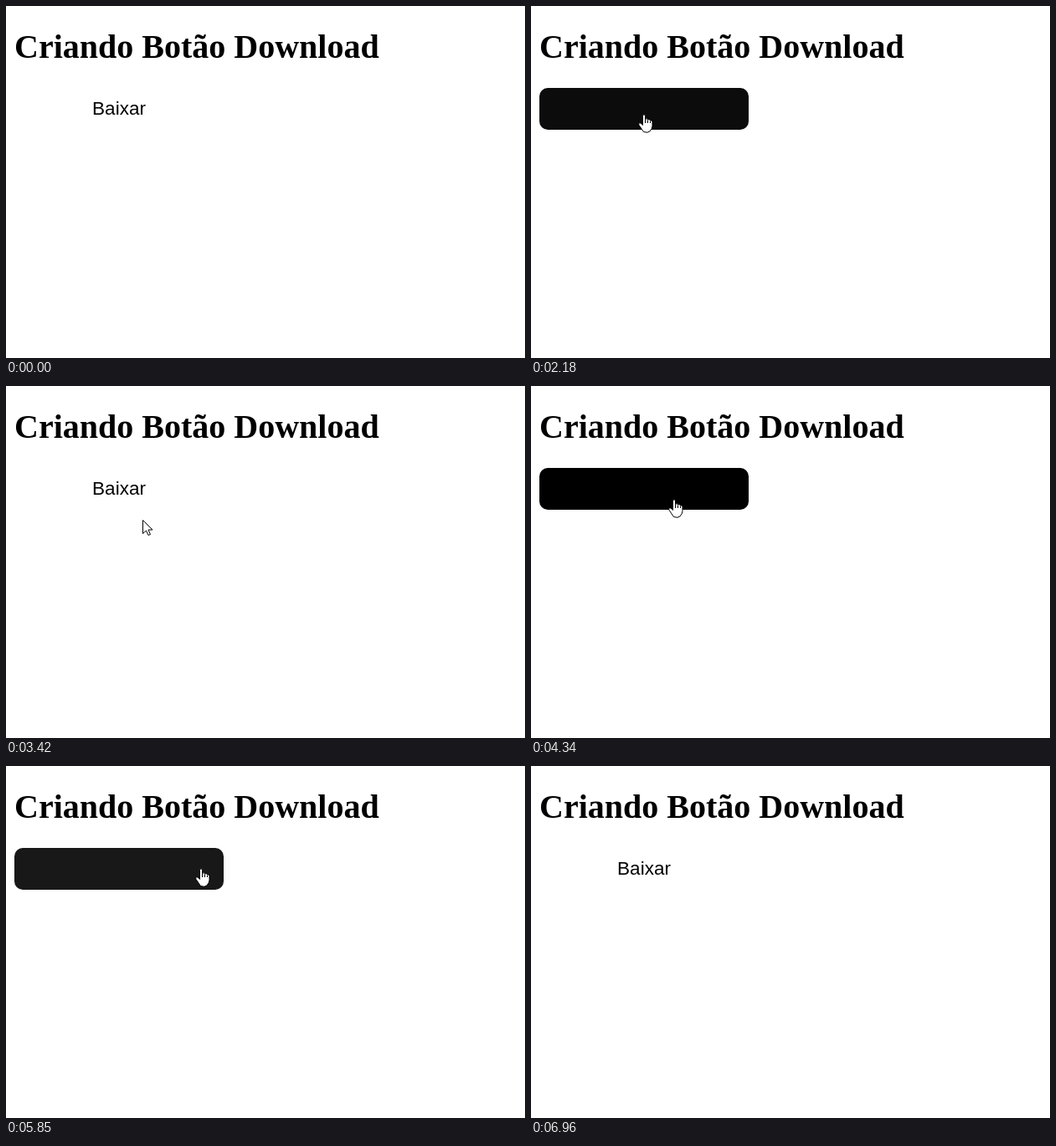
An HTML page with a canvas that plays this animation: 620x421 px, repeating every 7.23 s.

```html
<!DOCTYPE html>
<html lang="pt">
<head>
<meta charset="utf-8">
<title>Criando Botão Download</title>
<style>
  html, body { margin: 0; width: 100%; height: 100%; overflow: hidden; background: #fff; }
  canvas { display: block; }
</style>
</head>
<body>
<canvas id="stage" width="620" height="421"></canvas>
<script>
const ctx = document.getElementById('stage').getContext('2d');

const LOOP = 7230;
const START = 190;
const TICK = 69.1;
const FADE = 800;
const CURSOR_END = 6955;
const BUTTON = { x: 10, y: 98, w: 250, h: 50, r: 10 };

// Moments when the pointer enters and leaves the button, alternating.
const HOVER_EDGES = [1608, 2420, 3465, 4478, 5350, 6165];

// Pointer tip: time, x, y
const PATH = [
  [190, 549, 383], [870, 323, 129], [1150, 180, 62], [1350, 180, 62],
  [1608, 163, 98], [2020, 134, 129], [2320, 134, 129], [2420, 137, 146],
  [3020, 150, 228], [3090, 150, 228], [3425, 163, 164], [3470, 164, 150],
  [3720, 170, 135], [4340, 170, 135], [4478, 177, 148], [5030, 229, 194],
  [5168, 229, 194], [5350, 231, 148], [5640, 232, 122], [5850, 232, 122],
  [6165, 266, 150], [6340, 404, 262], [6540, 538, 381], [6680, 552, 407],
  [6960, 552, 407]
];

const ARROW = [[0, 0], [0, 16], [4, 12.5], [6.5, 18], [9, 17], [6.5, 11.5], [11.5, 11.5]];

function bezier(u, a, b) {
  return 3 * u * (1 - u) ** 2 * a + 3 * u * u * (1 - u) * b + u ** 3;
}

// The CSS "ease" curve
function ease(p) {
  if (p >= 1) return 1;
  let lo = 0, hi = 1;
  for (let i = 0; i < 24; i++) {
    const mid = (lo + hi) / 2;
    if (bezier(mid, 0.25, 0.25) < p) lo = mid; else hi = mid;
  }
  return bezier(lo, 0.1, 1);
}

function slope(i, axis) {
  const a = PATH[i], b = PATH[i + 1];
  return a && b ? (b[axis] - a[axis]) / (b[0] - a[0]) : 0;
}

function tangent(i, axis) {
  const before = slope(i - 1, axis), after = slope(i, axis);
  return before * after > 0 ? 2 * before * after / (before + after) : 0;
}

// Monotone cubic interpolation along the path
function pointerAt(t) {
  let i = 0;
  while (i < PATH.length - 2 && PATH[i + 1][0] <= t) i++;
  const a = PATH[i], b = PATH[i + 1], span = b[0] - a[0];
  const u = (t - a[0]) / span, v = 1 - u;
  return [1, 2].map(axis => Math.round(
    v * v * (1 + 2 * u) * a[axis] + u * u * (3 - 2 * u) * b[axis] +
    span * u * v * (v * tangent(i, axis) - u * tangent(i + 1, axis))
  ));
}

function hoverAt(t) {
  const passed = HOVER_EDGES.filter(edge => edge <= t);
  const over = passed.length % 2 === 1;
  const p = passed.length ? ease((t - passed[passed.length - 1]) / FADE) : 1;
  return { over, amount: over ? p : 1 - p };
}

function drawButton(amount) {
  ctx.save();
  ctx.beginPath();
  ctx.roundRect(BUTTON.x, BUTTON.y, BUTTON.w, BUTTON.h, BUTTON.r);
  ctx.fillStyle = `rgba(0, 0, 0, ${amount})`;
  ctx.fill();
  ctx.clip();
  ctx.fillStyle = '#000';
  ctx.font = '22.5px "Liberation Sans", Arial, sans-serif';
  ctx.textAlign = 'center';
  ctx.fillText('Baixar', BUTTON.x + BUTTON.w / 2, 130 - Math.round(amount * BUTTON.h));
  ctx.restore();
}

function arrowPath() {
  ctx.beginPath();
  ARROW.forEach(([x, y]) => ctx.lineTo(x, y));
  ctx.closePath();
}

function handPath() {
  ctx.beginPath();
  ctx.moveTo(-1, 13);
  ctx.lineTo(-1, 1.5);
  ctx.quadraticCurveTo(0.5, -1, 2, 1.5);
  ctx.lineTo(2, 6);
  ctx.quadraticCurveTo(4, 4, 5, 6.5);
  ctx.quadraticCurveTo(7, 5, 8, 7.5);
  ctx.quadraticCurveTo(10, 6.5, 10.5, 9);
  ctx.lineTo(10.5, 14);
  ctx.quadraticCurveTo(10, 18, 8, 19.5);
  ctx.lineTo(8, 20);
  ctx.quadraticCurveTo(5, 23, 0, 21);
  ctx.lineTo(-5.5, 13);
  ctx.quadraticCurveTo(-6.5, 9.5, -3.5, 10.5);
  ctx.closePath();
}

function drawPointer([x, y], over) {
  ctx.save();
  ctx.translate(x + 0.5, y + 0.5);
  ctx.lineWidth = 1;
  ctx.fillStyle = '#fff';
  ctx.strokeStyle = '#000';
  if (over) handPath(); else arrowPath();
  ctx.fill();
  ctx.stroke();
  if (over) {
    ctx.beginPath();
    [[2, 6], [5, 7], [8, 8]].forEach(([fx, fy]) => {
      ctx.moveTo(fx, fy);
      ctx.lineTo(fx, 10.5);
    });
    ctx.stroke();
  }
  ctx.restore();
}

function draw(time) {
  const t = START + Math.floor((time - START) / TICK + 0.35) * TICK;
  const hover = hoverAt(t);

  ctx.fillStyle = '#fff';
  ctx.fillRect(0, 0, 620, 421);
  ctx.fillStyle = '#000';
  ctx.font = 'bold 40px "Liberation Serif", "Times New Roman", serif';
  ctx.fillText('Criando Botão Download', 10, 62);
  drawButton(hover.amount);
  if (t >= START && t < CURSOR_END) drawPointer(pointerAt(t), hover.over);
}

const begin = performance.now();
function frame() {
  draw((performance.now() - begin) % LOOP);
  requestAnimationFrame(frame);
}
frame();
</script>
</body>
</html>
```
